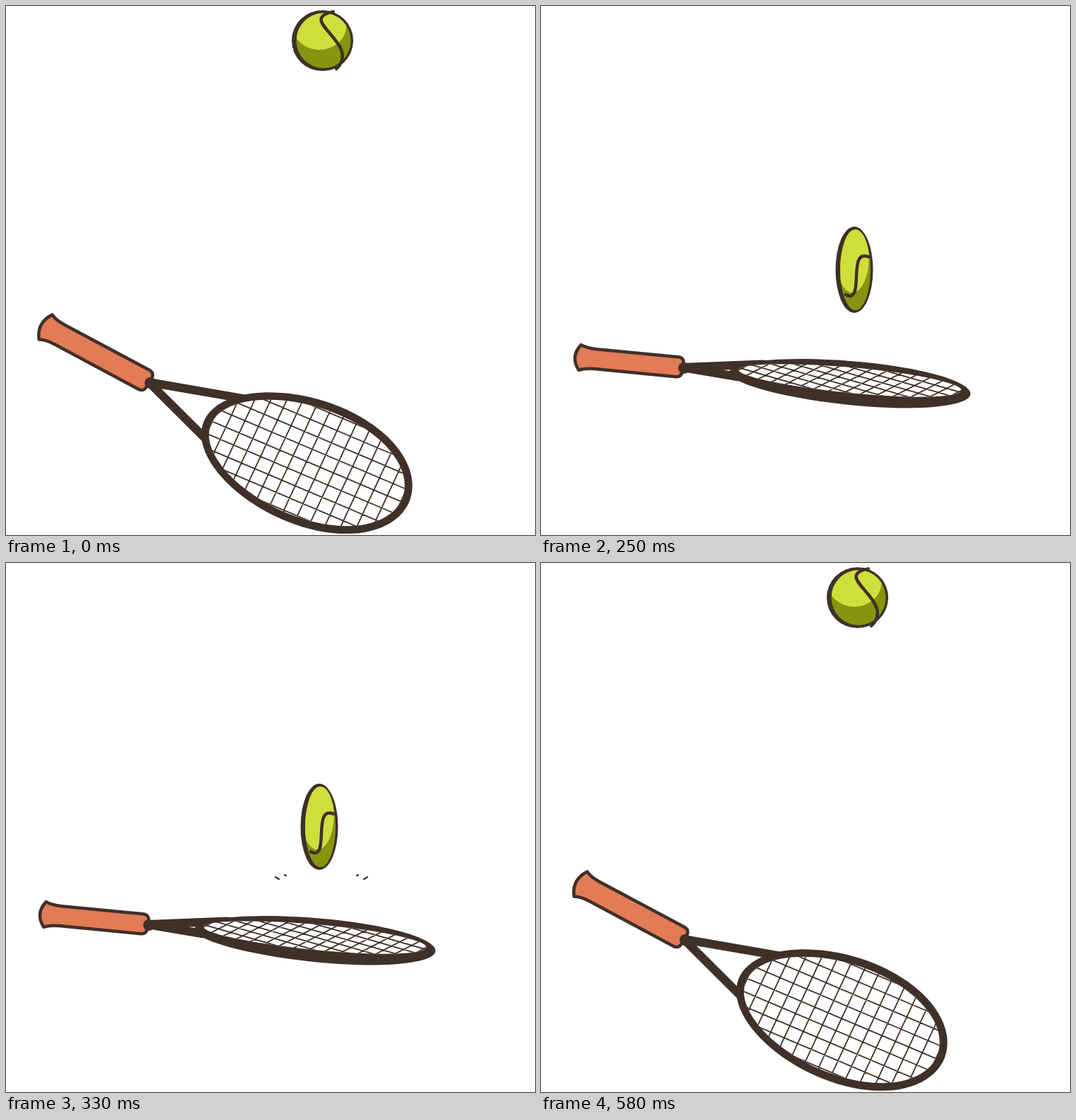
Recreate the animation shown at these times as an HTML page with a canvas. Size 748 by 748 pixels, loop 0.62 s.

```html
<!DOCTYPE html>
<html lang="en">
<head>
<meta charset="utf-8">
<title>Tennis bounce</title>
<style>
html, body { margin: 0; width: 100%; height: 100%; overflow: hidden; background: #fff; }
canvas { display: block; }
</style>
</head>
<body>
<canvas id="stage" width="748" height="748"></canvas>
<script>
const ctx = document.getElementById('stage').getContext('2d');
const DARK = '#3f3028', GRIP = '#e27b56', LIGHT = '#d0de3b', SHADE = '#87940f';
const LOOP = 620;

// grip: butt x, y, neck x, y, half width     head: inner centre x, y, radii, degrees
// rim: thickness, downward shift             strings: main and cross degrees, fan
// ball: centre x, y, radii, highlight lift   seam: Bezier curve in units of the radii
const high = {
  grip: [56, 454, 202, 532, 15.5], head: [425, 644, 145, 78, 20.8], rim: [11, 0], strings: [23, 115, 0],
  ball: [447.5, 49, 43.5, 43, 0.5], seam: [0.35, -0.95, -0.9, -0.7, 1.3, 0.1, 0.45, 0.93]
};
const falling = {
  grip: [60, 463, 208, 519, 13], head: [423, 613, 158, 59, 17.6], rim: [14, 2], strings: [18, 98, -12],
  ball: [447, 121, 41, 38.5, 0.42], seam: [-0.2, -0.92, -1.1, -0.1, 1.2, -0.3, 0.3, 0.93]
};
const low = {
  grip: [55, 497, 200, 511, 14], head: [437, 529, 158, 18, 5.3], rim: [13, 4], strings: [16, 153, 0],
  ball: [443, 373, 26.5, 61, 0.27], seam: [0.75, -0.3, -0.4, -0.5, 0.6, 0.8, -0.45, 0.58]
};
const rising = {
  grip: [53, 469, 195, 501, 14.5], head: [450, 572, 153, 37, 16], rim: [11, 2], strings: [16, 62, 0],
  ball: [444.5, 217.5, 33.5, 43.5, 0.22], seam: [-0.88, 0.12, -0.3, 0.5, 0.4, -0.9, 0.8, 0.5]
};
const impact = { ...low, ball: [443, 483, 52, 34, 0.3], sparkSize: 3 };
const rebound = { ...low, sparkSize: 1 };

const blend = (a, b, t) => Object.fromEntries(
  Object.keys(a).map(key => [key, a[key].map((v, i) => v + (b[key][i] - v) * t)]));

const timeline = [
  [80, high], [170, falling], [250, blend(falling, low, 0.46)], [290, low],
  [330, impact], [420, rebound], [500, rising], [580, blend(rising, high, 0.6)], [LOOP, high]
];

const radians = degrees => degrees * Math.PI / 180;

function fill(path, color) {
  ctx.fillStyle = color;
  ctx.fill(path);
}

function stroke(path, width) {
  ctx.strokeStyle = DARK;
  ctx.lineWidth = width;
  ctx.stroke(path);
}

function clipped(path, draw) {
  ctx.save();
  ctx.clip(path);
  draw();
  ctx.restore();
}

function ellipse(x, y, rx, ry) {
  const path = new Path2D();
  path.ellipse(x, y, rx, ry, 0, 0, Math.PI * 2);
  return path;
}

function addLine(path, x1, y1, x2, y2) {
  path.moveTo(x1, y1);
  path.lineTo(x2, y2);
}

// Point on the slightly egg-shaped head, enlarged by grow
function headPoint([cx, cy, a, b, tilt], grow, degrees) {
  const t = radians(degrees), r = radians(tilt);
  const x = (a + grow) * Math.cos(t);
  const y = (b + grow) * Math.sin(t) * (1 + 0.06 * Math.cos(t));
  return [cx + x * Math.cos(r) - y * Math.sin(r), cy + x * Math.sin(r) + y * Math.cos(r)];
}

function headOutline(head, grow) {
  const path = new Path2D();
  for (let t = 0; t < 360; t += 4) path.lineTo(...headPoint(head, grow, t));
  path.closePath();
  return path;
}

function drawStrings([cx, cy, a, b, tilt], [main, cross, fan]) {
  const path = new Path2D(), r = radians(tilt), reach = 350;
  const string = (x, y, degrees) => {
    const dx = reach * Math.cos(radians(degrees)), dy = reach * Math.sin(radians(degrees));
    addLine(path, x - dx, y - dy, x + dx, y + dy);
  };
  const mainGap = 6 + b / 6, crossGap = a / 7;
  for (let i = -9; i <= 9; i++) {
    const along = i * crossGap, across = i * mainGap;
    string(cx + along * Math.cos(r), cy + along * Math.sin(r), cross + fan * along / a);
    string(cx - across * Math.sin(r), cy + across * Math.cos(r), main);
  }
  stroke(path, 1.8);
}

function drawHandle([x, y, neckX, neckY, half]) {
  const length = Math.hypot(neckX - x, neckY - y), flare = half * 1.28;
  const path = new Path2D();
  path.moveTo(0, -flare);
  path.quadraticCurveTo(8, -half, 22, -half);
  path.lineTo(length - 8, -half);
  path.quadraticCurveTo(length + 4, -half, length, 0);
  path.quadraticCurveTo(length + 2, half, length - 8, half);
  path.lineTo(22, half);
  path.quadraticCurveTo(8, half, 0, flare);
  path.quadraticCurveTo(-14, 0, 0, -flare);
  ctx.save();
  ctx.translate(x, y);
  ctx.rotate(Math.atan2(neckY - y, neckX - x));
  fill(path, GRIP);
  stroke(path, 4.5);
  ctx.restore();
}

function drawRacket({ grip, head, rim: [band, drop], strings }) {
  const [, , neckX, neckY] = grip;
  const [cx, cy, ...shape] = head;
  const outer = [cx, cy + drop, ...shape], hole = headOutline(head, 0);
  const beams = new Path2D();
  for (const join of [-140, 165]) addLine(beams, neckX, neckY, ...headPoint(outer, band / 2, join));
  stroke(beams, 12);
  fill(headOutline(outer, band), DARK);
  fill(hole, '#fff');
  clipped(hole, () => drawStrings(head, strings));
  drawHandle(grip);
  fill(ellipse(neckX + 2, neckY + 1, 8, 8), DARK);
}

function drawBall({ ball: [x, y, rx, ry, lift], seam }) {
  const skin = ellipse(x + 1.5, y, rx - 5, ry - 4);
  const [startX, startY, ...rest] = seam.map((v, i) => i % 2 ? y + v * ry : x + v * rx);
  const curve = new Path2D();
  curve.moveTo(startX, startY);
  curve.bezierCurveTo(...rest);
  fill(ellipse(x, y, rx, ry), DARK);
  fill(skin, SHADE);
  clipped(skin, () => fill(ellipse(x - rx * 0.1, y - ry * lift, rx * 0.88, ry * 0.8), LIGHT));
  stroke(curve, 4.5);
}

function drawSparks(size) {
  const path = new Path2D();
  for (const side of [-1, 1]) {
    const x = 446 + side * 60;
    addLine(path, x, 447, x + side * 5 * size, 447 - 3 * size);
    addLine(path, x - side * 8, 441, x - side * (8 + 2 * size), 441 + size);
  }
  stroke(path, 2.2);
}

function render(now) {
  const time = now % LOOP;
  const pose = timeline.find(([end]) => time < end)[1];
  ctx.fillStyle = '#fff';
  ctx.fillRect(0, 0, 748, 748);
  drawRacket(pose);
  drawBall(pose);
  if (pose.sparkSize) drawSparks(pose.sparkSize);
  requestAnimationFrame(render);
}

ctx.lineCap = ctx.lineJoin = 'round';
render(performance.now());
</script>
</body>
</html>
```
